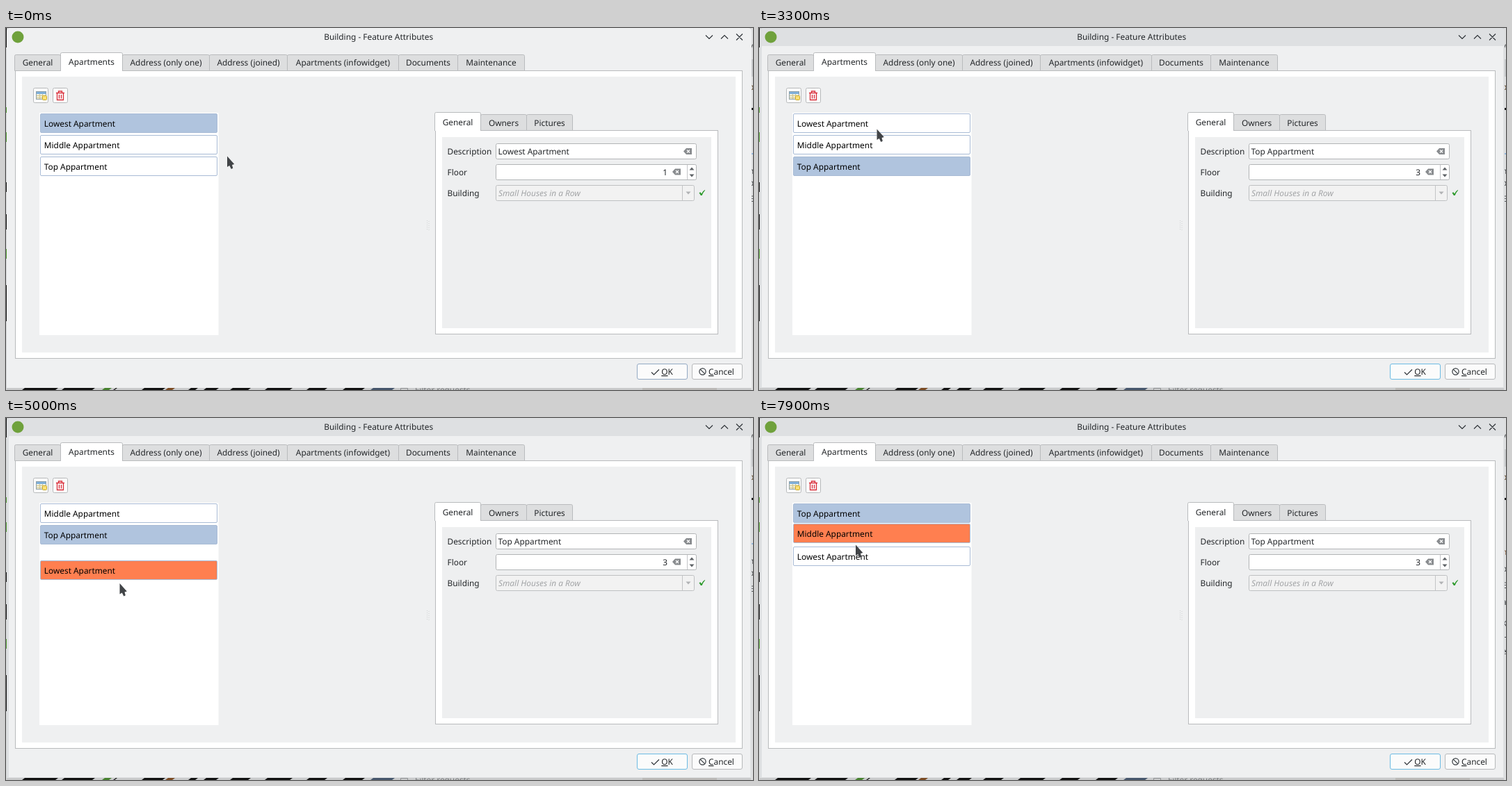
Animation of 1074 by 521 pixels, one loop 8000 ms. Source, as an HTML page:

```html
<!DOCTYPE html>
<html lang="en">
<head>
<meta charset="utf-8">
<title>Feature attributes</title>
<style>
  html, body { margin: 0; width: 100%; height: 100%; overflow: hidden; background: #c9cacb; }
  svg { display: block; width: 100vw; height: 100vh; }
  text { font: 11.87px "Noto Sans", sans-serif; fill: #232629; white-space: pre; text-rendering: geometricPrecision; }
  .row text { fill: #000; }
  .mid { text-anchor: middle; }
  .end { text-anchor: end; }
  .line { fill: none; stroke: #31363b; stroke-width: 1.2; }
  .u { text-decoration: underline; }
</style>
</head>
<body>
<svg id="stage" viewBox="0 0 1074 521" xmlns="http://www.w3.org/2000/svg">
  <g id="behind"></g>
  <g id="side"></g>
  <path id="frame" d="M1 518V5Q1 0 6 0H1067Q1072 0 1072 5V518Z"/>
  <rect x="1" y="26" width="1071" height="492" fill="#eff0f1"/>
  <g id="edge" fill="#dee0e2">
    <rect x="1" y="26" width="3" height="492"/>
    <rect x="1070" y="26" width="2" height="492"/>
    <rect x="1" y="517" width="1071" height="1"/>
  </g>

  <circle cx="17" cy="13" r="8.5" fill="#6fa13c"/>
  <text class="mid" x="535.7" y="17">Building - Feature Attributes</text>
  <path class="line" d="M1006 10.5l5 5l5 -5M1028 15.5l5 -5l5 5M1050 8.5l9 9M1059 8.5l-9 9"/>

  <rect x="13.5" y="61.5" width="1045" height="414" fill="#fff" stroke="#b9bbbd"/>
  <rect x="23" y="70" width="1026" height="397" fill="#eff0f1"/>
  <g id="tabs"></g>

  <g fill="#fbfbfb" stroke="#b7b9bb">
    <rect x="39.5" y="86.5" width="21" height="21" rx="2"/>
    <rect x="67.5" y="86.5" width="21" height="21" rx="2"/>
  </g>
  <rect x="43.5" y="91.5" width="14" height="11" fill="#f1efdc" stroke="#8fa0a8"/>
  <rect x="44" y="92" width="13" height="3" fill="#7fb0dc"/>
  <path d="M44 97.5h13M44 100.5h13M48.5 95v7M52.5 95v7" stroke="#cfc48c" fill="none"/>
  <rect x="52.5" y="97.5" width="6" height="6" rx="1" fill="#fbe07a" stroke="#c9a820"/>
  <path d="M72 93.5h12M75.5 93v-2h5v2M73.5 94v9.5h9v-9.5M76.5 96v5.5M79.5 96v5.5" fill="none" stroke="#da2f3b" stroke-width="1.3"/>

  <rect x="48" y="122" width="257.5" height="320" fill="#fff"/>
  <path d="M605.5 277v14M608 278v14" stroke="#cfd1d2" stroke-dasharray="1 2" fill="none"/>

  <rect x="617.5" y="147.5" width="406" height="293" fill="#fff" stroke="#b9bbbd"/>
  <rect x="627" y="157" width="387" height="275" fill="#eeeff0"/>
  <g id="subtabs"></g>

  <text x="634.5" y="182">Description</text>
  <text x="634.5" y="212">Floor</text>
  <text x="634.5" y="241.5">Building</text>
  <g fill="#fff" stroke="#b2b4b6">
    <rect x="704.5" y="166.5" width="288" height="22" rx="2"/>
    <rect x="704.5" y="196.5" width="288" height="22" rx="2"/>
    <rect x="704.5" y="226.5" width="285" height="22" rx="2" fill="#f2f2f2" stroke="#bec0c2"/>
    <path d="M979.5 197v21M972.5 227v21" stroke="#c3c5c7"/>
  </g>
  <text id="name" x="707.5" y="182"></text>
  <text id="floor" class="end" x="951" y="212"></text>
  <text x="708" y="241.5" style="font-style:italic;fill:#a3a5a7">Small Houses in a Row</text>
  <g id="clears"></g>
  <path d="M982.5 204.5l3.5 -4l3.5 4zM982.5 210.5l3.5 4l3.5 -4z" fill="#5d6165"/>
  <path d="M977.5 235.5h7l-3.5 4z" fill="#b0b2b4"/>
  <path d="M996.5 237.2l1.9 -1l1.5 2.2q1.700 -3.500 4.800 -5.300l.5 .4q-3 3.200 -4.600 7.600h-1.700z" fill="#2c9a2c"/>

  <rect id="ok" x="907.5" y="483.5" width="72" height="22" rx="2.5" fill="#fbfbfb"/>
  <path class="line" d="M928 495.5l3.5 3.5l7.5 -7.5"/>
  <text x="942.3" y="499"><tspan class="u">O</tspan>K</text>
  <rect x="986.5" y="483.5" width="72" height="22" rx="2.5" fill="#fbfbfb" stroke="#b7b9bb"/>
  <circle class="line" cx="1001.5" cy="494.5" r="4.6"/>
  <path class="line" d="M998.3 491.3l6.4 6.4"/>
  <text x="1010" y="499"><tspan class="u">C</tspan>ancel</text>

  <g id="rows"></g>
  <path id="cursor" d="M0 0V15.500L3.300 13.400L5.800 18.400L8.300 17.200L7 12.600L10.300 11.600Z" fill="#414447" stroke="#fff" stroke-opacity=".5" stroke-linejoin="round" paint-order="stroke"/>
</svg>
<script>
const $ = id => document.getElementById(id);
const LOOP = 8000, STEP = 100, ROW = 31;
const names = ["Lowest Apartment", "Middle Appartment", "Top Appartment"];

// Tab strips: edges between tabs, the active one is taller and open below
function tabStrip(id, labels, edges, active, top, bottom, baseline) {
  const tab = (label, i) => {
    const on = i === active, x = edges[i] + .5, r = edges[i + 1] + .5;
    const y = (on ? top - 3 : top) + .5, b = on ? bottom + 1 : bottom + .5;
    const path = `M${x} ${b}V${y + 2}q0 -2 2 -2H${r - 2}q2 0 2 2V${b}`;
    return `<path d="${path}" fill="${on ? "#fff" : "#dddedf"}" stroke="#b9bbbd"/>` +
      (on ? "" : `<path d="M${x} ${b}H${r}" stroke="#b9bbbd"/>`) +
      `<text class="mid" x="${(x + r) / 2}" y="${on ? baseline - 1 : baseline}">${label}</text>`;
  };
  const all = labels.map(tab);
  all.push(...all.splice(active, 1));
  $(id).innerHTML = all.join("");
}
tabStrip("tabs", ["General", "Apartments", "Address (only one)", "Address (joined)",
  "Apartments (infowidget)", "Documents", "Maintenance"],
  [12, 78, 167, 292, 404, 564, 649, 745], 1, 38, 61, 54);
tabStrip("subtabs", ["General", "Owners", "Pictures"], [616, 682, 748, 814], 0, 124, 147, 141);

$("clears").innerHTML = [[974, 173], [958, 202.5]].map(([x, y]) =>
  `<path d="M${x} ${y + 4.5}l4 -4.5h8v9h-8z" fill="#888b8e"/>
   <path d="M${x + 5} ${y + 2.5}l4 4m0 -4l-4 4" stroke="#fff" stroke-width="1.2"/>`).join("");

// Slivers of the desktop around the dialog
const sliver = (x, y, w, h, c) => `<rect x="${x}" y="${y}" width="${w}" height="${h}" fill="${c}"/>`;
const left = [[0, 28, "#111"], [114, 8, "#4f9a2f"], [150, 14, "#4f9a2f"], [222, 14, "#111"],
  [268, 22, "#111"], [318, 14, "#4f9a2f"], [370, 52, "#111"]];
const below = [[23, 52, "#111"], [80, 48, "#111"], [138, 14, "#47812f"], [154, 6, "#111"],
  [195, 34, "#111"], [229, 14, "#7a4a22"], [262, 14, "#111"], [284, 22, "#111"],
  [322, 30, "#111"], [372, 40, "#111"], [432, 30, "#111"], [484, 32, "#111"], [524, 35, "#46566c"]];
// Strokes under the dialog run on a slant
const slant = ([x, w, c]) => `<path d="M${x + 4} 518h${w - 4}l-4 3h${4 - w}z" fill="${c}"/>`;
$("behind").innerHTML = sliver(0, 0, 1, 521, "#d4d5d6") + sliver(1071, 0, 3, 521, "#dcddde") +
  left.map(([y, h, c]) => sliver(0, y, 1, h, c)).join("") +
  below.map(slant).join("") +
  `<path d="M567.5 521v-2.5h10v2.5" fill="none" stroke="#8d8f91"/>
   <text x="588" y="525" style="fill:#77797b">Filter requests</text>` +
  sliver(915, 518, 107, 3, "#bbb9b7");

const glyphs = list => list.map(([s, y, c]) =>
  `<text x="1068" y="${y}" style="fill:${c || "#3a3d40"}">${s}</text>`).join("");
const sideTop = glyphs([["v", 30], ["p", 89, "#5a4020"]]) +
  sliver(1072, 45, 2, 25, "#c3c5c7") + sliver(1071, 115, 3, 3, "#111");
const sideViews = [
  sliver(1072, 180, 2, 2, "#8fb3da") + glyphs([["n", 210], ["o", 227], ["E", 250]]),
  glyphs([["n", 197, "#7a5230"], ["o", 221], ["E", 245], ["a", 269], ["u", 293], ["L", 316], ["e", 340]]),
  glyphs([["n", 197, "#7a5230"], ["o", 221], ["E", 245], ["a", 269], ["K", 300], ["L", 316], ["e", 340]])
];

$("rows").innerHTML = names.map(n => `<g class="row">
  <rect x="49.5" y=".5" width="254" height="27" rx="1.5" stroke="#a8bbd5"/>
  <text x="54.8" y="19">${n}</text></g>`).join("");
const rows = [...document.querySelectorAll(".row")];

// Tracks of [time, ...values]; values ease between neighbouring keys
const pointer = [[0, 318, 184.5], [400, 318, 184.5], [800, 236.5, 164.5], [1500, 236.5, 164.5],
  [1800, 217.5, 188.5], [2000, 217.5, 188.5], [2200, 218, 194], [2600, 218, 194],
  [3100, 171, 149.5], [3200, 171, 149.5], [3300, 169.5, 145.5], [4300, 169.5, 145.5],
  [4400, 168.5, 160.5], [5000, 163.5, 238], [5400, 163.5, 238], [6100, 156, 140.5],
  [7300, 156, 140.5], [7900, 139, 182.5]];
const firstDrag = [[4400, 0], [5000, 82]];
const secondDrag = [[7500, 0], [7900, 29]];
const lowestHeat = [[3700, 0], [3900, 1], [5200, 1], [5400, 0]];
const middleHeat = [[6600, 0], [6800, 1]];

function at(track, t) {
  const i = track.findIndex(k => k[0] > t);
  if (i === 0) return track[0].slice(1);
  if (i < 0) return track[track.length - 1].slice(1);
  const a = track[i - 1], b = track[i];
  const p = (t - a[0]) / (b[0] - a[0]), e = p * p * (3 - 2 * p);
  return a.slice(1).map((v, j) => v + (b[j + 1] - v) * e);
}

// White to coral
const heatColor = k => `rgb(255,${255 - 128 * k},${255 - 175 * k})`;

let shownSide = -1;
function draw(ms) {
  const t = Math.floor(ms / STEP) * STEP;
  const active = t >= 1200;
  const current = t < 1200 ? 0 : t < 2600 ? 1 : 2;
  const [d1] = at(firstDrag, t), [d2] = at(secondDrag, t);
  const dropped = t >= 5300;

  const lowestY = dropped ? 2 * ROW : d1;
  const middleY = d1 >= 28 ? d2 : ROW;
  const topY = d2 >= 28 ? 0 : d1 >= 59 ? ROW : 2 * ROW;
  const heat = [at(lowestHeat, t)[0], at(middleHeat, t)[0], 0];
  [lowestY, middleY, topY].forEach((y, i) => {
    rows[i].setAttribute("transform", `translate(0 ${123 + Math.round(y)})`);
    rows[i].firstElementChild.setAttribute("fill",
      heat[i] ? heatColor(heat[i]) : i === current ? "#b0c4de" : "#fff");
  });
  // The dragged row stays above the others
  const lifted = rows[dropped ? 1 : 0];
  if ($("rows").lastElementChild !== lifted) $("rows").append(lifted);

  $("name").textContent = names[current];
  $("floor").textContent = current + 1;
  $("ok").setAttribute("stroke", active ? "#6cbbe3" : "#93a9c4");
  $("frame").setAttribute("fill", active ? "#dee0e2" : "#eff0f1");
  $("edge").setAttribute("opacity", active ? 1 : 0);

  const side = t < 5400 ? 0 : t < 7900 ? 1 : 2;
  if (side !== shownSide) {
    $("side").innerHTML = sideTop + sideViews[side];
    shownSide = side;
  }
  const [x, y] = at(pointer, t);
  $("cursor").setAttribute("transform", `translate(${x} ${y})`);
}

const start = performance.now();
function tick() {
  draw((performance.now() - start) % LOOP);
  requestAnimationFrame(tick);
}
draw(0);
requestAnimationFrame(tick);
</script>
</body>
</html>
```
